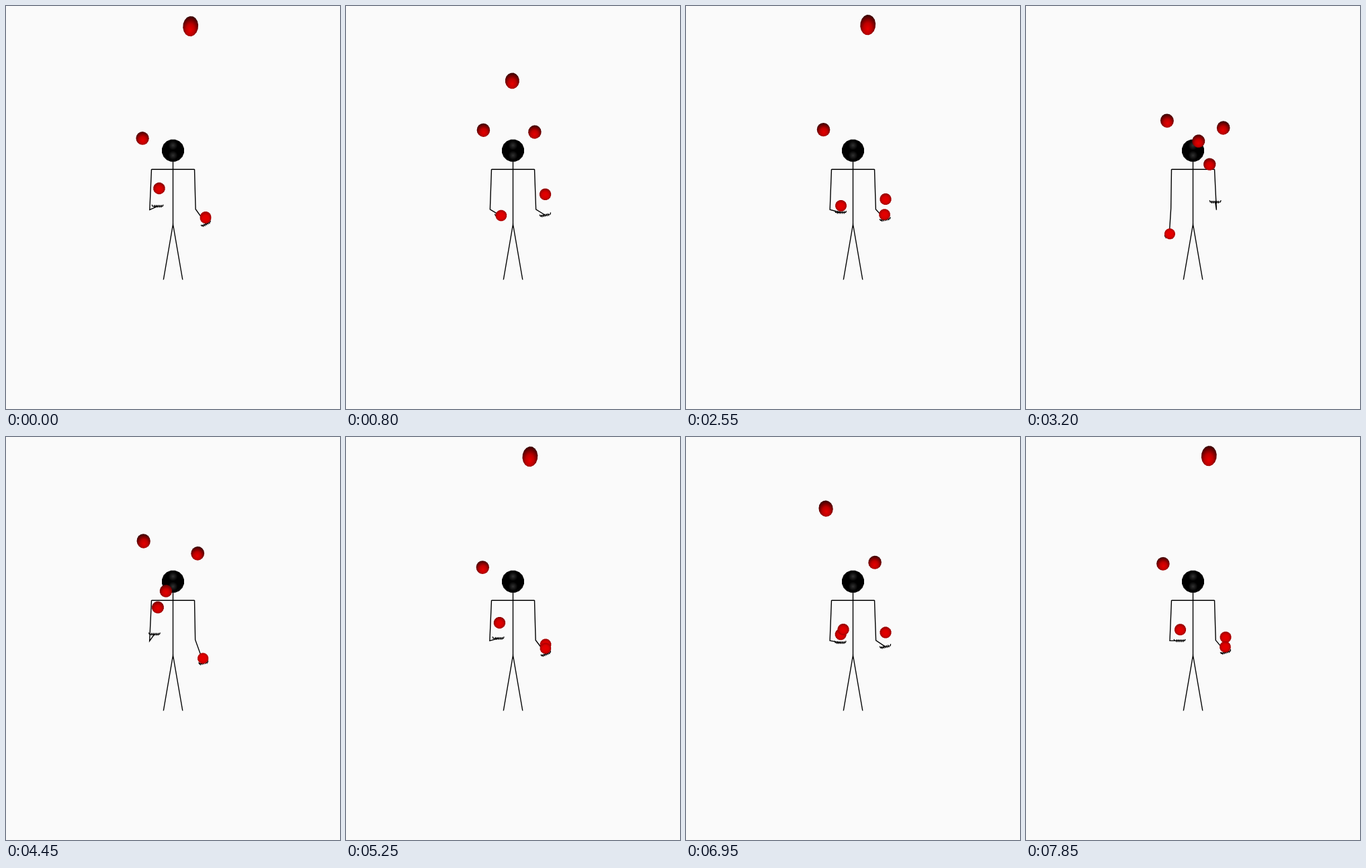
Animation of 497 by 600 pixels, one loop 7900 ms. Source, as an HTML page with a canvas:

```html
<!DOCTYPE html>
<html lang="en">
<head>
<meta charset="utf-8">
<title>Juggler</title>
<style>
  html, body { margin: 0; width: 100%; height: 100%; overflow: hidden; background: #fafafa; }
  canvas { display: block; }
</style>
</head>
<body>
<canvas id="stage" width="497" height="600"></canvas>
<script>
const ctx = document.getElementById('stage').getContext('2d');

const LOOP = 7900, STEP = 50;
const CYCLE = LOOP / 3;            // one full pattern, both hands
const BEAT = CYCLE / 6;
const DWELL = BEAT * 2 / 3;
const RETURN = 2 * BEAT - DWELL;   // from a throw to the next catch

// Throws of one hand: a single, then a pair from the same spot
const SINGLE = -141, PAIR = SINGLE - 2 * BEAT;
const LOW = 4 * BEAT - DWELL, HIGH = 5 * BEAT - DWELL;
const FLIGHTS = [
  { start: SINGLE, time: LOW, cross: false },
  { start: PAIR, time: LOW, cross: false },
  { start: PAIR, time: HIGH, cross: true }
];

// Perspective: vertical lines meet at VANISH, hands work LEVEL above it
const MID = 248.5, VANISH = 1000, LEVEL = 684, GRAVITY = 3.276e-7;
const INNER = -16.2, OUTER = -48.5;

const mod = (a, n) => ((a % n) + n) % n;
const clamp = v => Math.min(1, Math.max(0, v));
const mix = (a, b, u) => a + (b - a) * u;
const arch = u => Math.sin(Math.PI * u);
const swing = u => (1 - Math.cos(Math.PI * u ** 0.9)) / 2;

function flightPoint({ time, cross }, age) {
  const depth = 1 - GRAVITY * age * (time - age);
  const off = mix(INNER, cross ? -OUTER : OUTER, age / time);
  return [MID + off / depth, VANISH - LEVEL / depth];
}

// Left hand: an arch back from throw to catch, then a scoop from catch to throw.
// Of every three rounds, the last keeps its ball.
function handState(s) {
  const since = mod(s - PAIR, CYCLE);
  const keeps = since >= 4 * BEAT;
  const age = since % (2 * BEAT);
  const base = VANISH - LEVEL, left = MID + OUTER, right = MID + INNER;
  let x, y, sink, tilt;
  if (age < RETURN) {
    const u = age / RETURN;
    x = mix(right, left, swing(u));
    y = base - (keeps ? 12 : 28) * arch(u);
    sink = mix(-1, 9, u);
    tilt = 0.5 * u ** 6;
  } else {
    const u = (age - RETURN) / DWELL;
    x = mix(left, right, swing(u));
    y = base + 24 * arch(u);
    sink = mix(9, -1, u);
    tilt = 0.5 * (1 - u) ** 4;
  }
  return {
    palm: [x - 1, y + sink],
    ball: keeps || age >= RETURN ? [x, y] : null,
    tilt
  };
}

function line(points, width = 1.4) {
  ctx.lineWidth = width;
  ctx.beginPath();
  points.forEach(([x, y]) => ctx.lineTo(x, y));
  ctx.stroke();
}

function facets(r, n) {
  ctx.beginPath();
  for (let i = 0; i < n; i++) {
    const a = (i + 0.5) * 2 * Math.PI / n;
    ctx.lineTo(r * Math.cos(a), r * Math.sin(a));
  }
  ctx.closePath();
  ctx.fill();
}

function drawBall([x, y]) {
  const depth = LEVEL / (VANISH - y);
  const r = 8.35 / depth ** 0.9;
  const stretch = 1 + 6.2e-6 * Math.max(0, 260 - y) ** 2;
  const rise = clamp((330 - y) / 150);
  ctx.save();
  ctx.translate(x, y);
  ctx.rotate(clamp((260 - y) / 100) * Math.atan2(x - MID, Math.abs(260 - y) + 100));
  ctx.scale(1, stretch);
  const g = ctx.createRadialGradient(0, r * 0.4 * rise, 0, 0, r * 0.25 * rise, r * 1.2);
  g.addColorStop(0, '#e60000');
  g.addColorStop(0.45, `rgb(${mix(226, 190, rise)},0,0)`);
  g.addColorStop(1, `rgb(${mix(150, 55, rise)},0,0)`);
  ctx.fillStyle = g;
  facets(r, 16);
  ctx.restore();
}

function glow(x, y, r, alpha) {
  const g = ctx.createRadialGradient(x, y, 0, x, y, r);
  g.addColorStop(0, `rgba(255,255,255,${alpha})`);
  g.addColorStop(1, 'rgba(255,255,255,0)');
  ctx.fillStyle = g;
  ctx.fillRect(x - r, y - r, 2 * r, 2 * r);
}

function drawBody() {
  line([[MID, 225], [MID, 325]]);
  line([[216.5, 243.3], [280.5, 243.3]]);
  line([[234.3, 407.5], [MID, 325], [262.8, 407.5]]);
  ctx.save();
  ctx.translate(MID, 215.2);
  ctx.fillStyle = '#000';
  facets(16.8, 16);
  ctx.restore();
  glow(MID, 207.5, 7, 0.2);
  glow(MID, 222.5, 7, 0.2);
}

function drawArm({ palm: [x, y], tilt }) {
  const low = y - 310;
  line([[216.5, 243], [214.3 + low * 0.04, 303 - low * 0.04], [x, y]]);
  ctx.save();
  ctx.translate(x, y);
  ctx.rotate(tilt);
  const reach = 8.5 - Math.max(0, low) * 0.05;
  line([[-reach, -2.5], [1 - reach, 0], [reach - 1, 0], [reach, -2.5]], 1.3);
  // knuckles
  for (let k = -5; k <= 5; k += 2.5) line([[k, 2], [k + 1, -2]], 1.2);
  ctx.restore();
}

function onSide(side, draw) {
  ctx.save();
  if (side) {
    ctx.translate(2 * MID, 0);
    ctx.scale(-1, 1);
  }
  draw();
  ctx.restore();
}

function render(t) {
  ctx.fillStyle = '#fafafa';
  ctx.fillRect(0, 0, 497, 600);
  ctx.strokeStyle = '#000';
  drawBody();

  const sides = [0, 1].map(side => {
    const s = t + side * CYCLE / 2;
    return { side, s, hand: handState(s) };
  });
  sides.forEach(({ side, hand }) => onSide(side, () => drawArm(hand)));
  sides.forEach(({ side, s, hand }) => onSide(side, () => {
    for (const flight of FLIGHTS) {
      const age = mod(s - flight.start, CYCLE);
      if (age < flight.time) drawBall(flightPoint(flight, age));
    }
    if (hand.ball) drawBall(hand.ball);
  }));
}

const begin = performance.now();
function tick() {
  const t = (performance.now() - begin) % LOOP;
  render(Math.floor(t / STEP) * STEP);
  requestAnimationFrame(tick);
}
tick();
</script>
</body>
</html>
```
